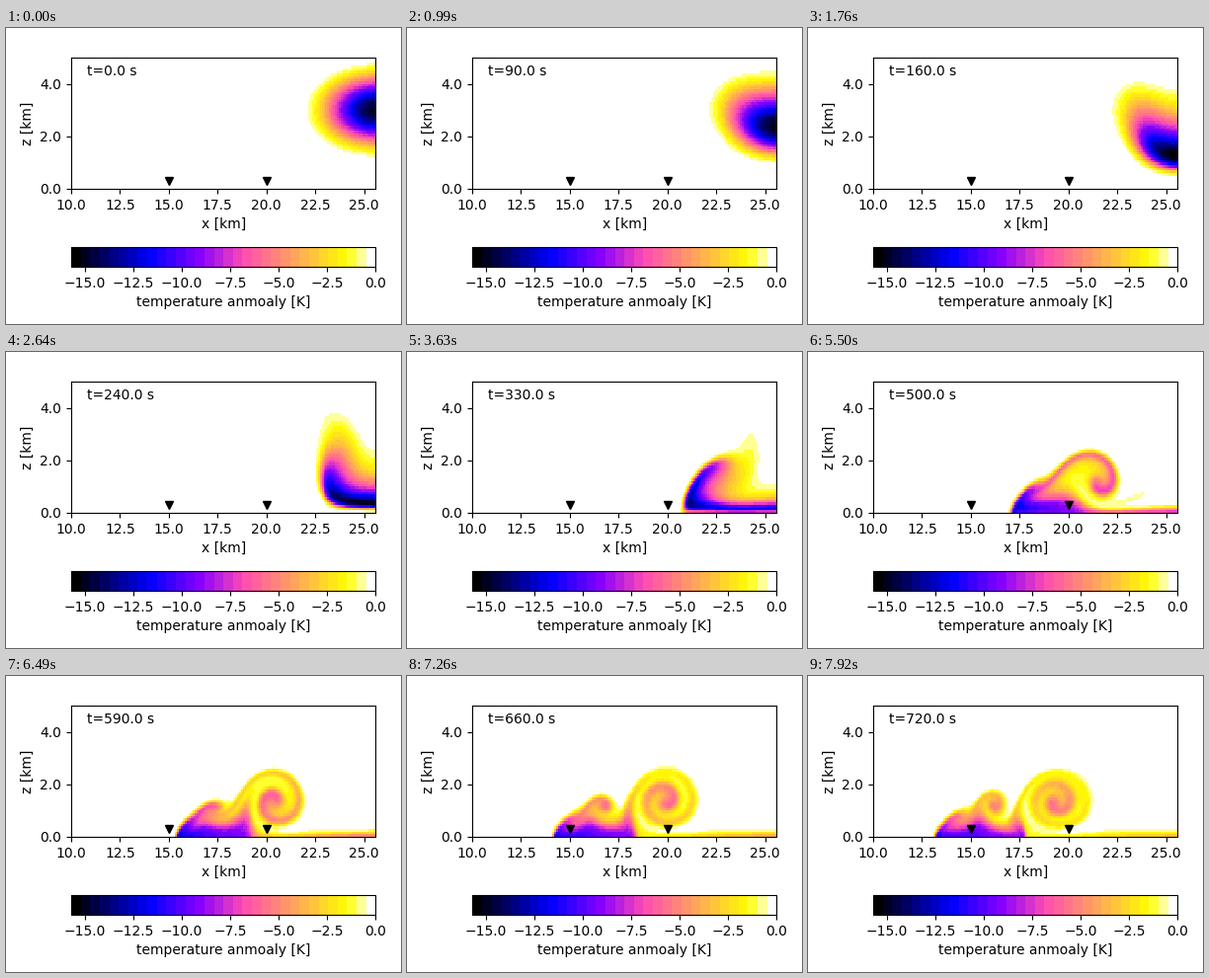
These frames come from a looping animation (400 by 300 pixels, 8000 ms). A matplotlib script:

```python
import numpy as np
import matplotlib.pyplot as plt
from matplotlib.animation import FuncAnimation

# Density current: a cold bubble sinks beside a symmetry wall in a neutral
# atmosphere. Anelastic vorticity-streamfunction model, lengths in metres.
G, CP, THETA0, VISCOSITY = 9.81, 1004.0, 300.0, 75.0
DX, DZ, NX, NZ = 100.0, 50.0, 192, 128
X_WALL = 25600.0
FRAMES, LOOP_MS = 73, 8000
FRAME_SECONDS, SUBSTEPS = 10.0, 6
F32 = np.float32


def exner_at(height):
    return 1 - G * height / (CP * THETA0)


x = X_WALL - DX * (NX - 0.5 - np.arange(NX))
z = DZ * (np.arange(NZ) + 0.5)
exner = exner_at(z)[:, None].astype(F32)
density = exner ** 2.5


def laplacian(weights, d):
    """Second-difference matrix with zero values on both walls."""
    diag = -(weights[:-1] + weights[1:])
    diag[0] -= weights[0]
    diag[-1] -= weights[-1]
    off = weights[1:-1]
    return (np.diag(diag) + np.diag(off, 1) + np.diag(off, -1)) / d ** 2


root = np.sqrt(exner_at(z) ** 2.5)
face_weights = exner_at(DZ * np.arange(NZ + 1)) ** -2.5
eig_z, modes_z = np.linalg.eigh(laplacian(face_weights, DZ) * np.outer(root, root))
eig_x, modes_x = np.linalg.eigh(laplacian(np.ones(NX + 1), DX))
inverse = (1 / (eig_z[:, None] + eig_x)).astype(F32)
modes_z, modes_x = modes_z.astype(F32), modes_x.astype(F32)
to_zt, to_xt = modes_z.T.copy(), modes_x.T.copy()


def shifted(f, sign):
    """Seven neighbours along the first axis, mirrored at the walls."""
    p = np.concatenate((sign * f[2::-1], f, sign * f[:-4:-1]))
    return [p[k:k + len(f)] for k in range(7)]


def slope(s, d):
    return (45 * (s[4] - s[2]) - 9 * (s[5] - s[1]) + s[6] - s[0]) / (60 * d)


def transport_1d(f, speed, d, sign):
    """Upwind advection plus diffusion along the first axis, and the slope."""
    s = shifted(f, sign)
    grad = slope(s, d)
    near = s[2] + s[4]
    damping = (s[0] + s[6] - 6 * (s[1] + s[5]) + 15 * near - 20 * f) / (60 * d)
    diffusion = (near - 2 * f) * (VISCOSITY / d ** 2)
    return np.abs(speed) * damping - speed * grad + diffusion, grad


def transport(f, u, w, sign):
    along_x, grad_x = transport_1d(f.T, u.T, DX, sign)
    along_z, _ = transport_1d(f, w, DZ, sign)
    return along_x.T + along_z, grad_x.T


def tendency(state):
    theta, vort = state
    source = density ** 1.5 * vort
    spectrum = (to_zt @ source @ modes_x) * inverse
    psi = density ** 0.5 * (modes_z @ spectrum @ to_xt)
    u = slope(shifted(psi, -1), DZ) / density
    w = -slope(shifted(psi.T, -1), DX).T / density
    d_theta, theta_x = transport(theta, u, w, 1)
    d_vort, _ = transport(vort, u, w, -1)
    return np.stack((d_theta, d_vort - (G / THETA0) * theta_x / density))


def step(state, dt):
    stage = state
    for divisor in (3, 2, 1):
        stage = state + (dt / divisor) * tendency(stage)
    return stage


def visible_field(state):
    """Temperature anomaly on 100 m cells inside the plotted window."""
    temperature = state[0] * exner
    cells = temperature.reshape(NZ // 2, 2, NX).mean(axis=1)
    return cells[:50, -156:]


def simulate():
    radius = np.hypot((x - X_WALL) / 4000, (z[:, None] - 3000) / 2000)
    bubble = -7.5 * (1 + np.cos(np.pi * np.minimum(radius, 1)))
    theta = (bubble / exner).astype(F32)
    state = np.stack((theta, np.zeros_like(theta)))
    fields = [visible_field(state)]
    for _ in range(FRAMES - 1):
        for _ in range(SUBSTEPS):
            state = step(state, FRAME_SECONDS / SUBSTEPS)
        fields.append(visible_field(state))
    return fields


fields = simulate()

fig = plt.figure(figsize=(4, 3), dpi=100)
ax = fig.add_axes([66 / 400, 137 / 300, 308.4 / 400, 133 / 300])
image = ax.imshow(fields[0], origin="lower", extent=(10, 25.6, 0, 5),
                  aspect="auto", interpolation="nearest",
                  cmap=plt.get_cmap("gnuplot2", 32), vmin=-15.72, vmax=0)
ax.plot([15, 20], [0.3, 0.3], "kv")
ax.set(xlim=(10, 25.6), ylim=(0, 5), xlabel="x [km]", ylabel="z [km]",
       xticks=np.arange(10, 25.1, 2.5), yticks=[0, 2, 4])
ax.yaxis.set_major_formatter("{x:.1f}")
clock = ax.text(10.8, 4.33, "t=0.0 s")

bar_ax = fig.add_axes([66 / 400, 58 / 300, 308.4 / 400, 20 / 300])
fig.colorbar(image, cax=bar_ax, orientation="horizontal",
             ticks=np.arange(-15, 0.1, 2.5), label="temperature anmoaly [K]")


def update(i):
    image.set_data(fields[i])
    clock.set_text(f"t={FRAME_SECONDS * i:.1f} s")
    return image, clock


animation = FuncAnimation(fig, update, frames=FRAMES, interval=LOOP_MS / FRAMES,
                          repeat=True, repeat_delay=0)
plt.show()
```
